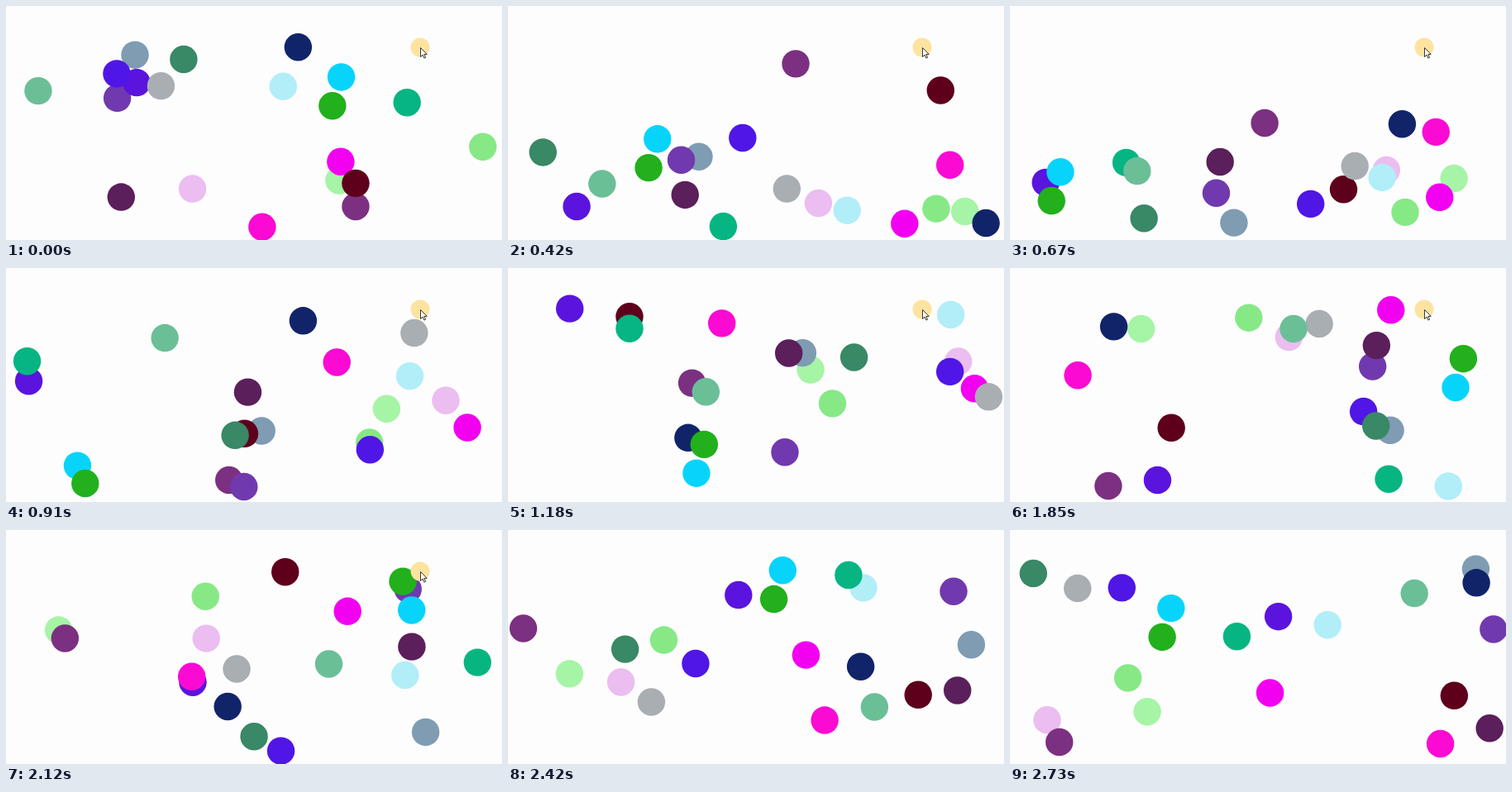
Animation of 600x283 px, one loop 2760 ms. Source, as an HTML page with a canvas:

```html
<!DOCTYPE html>
<html lang="en">
<head>
<meta charset="utf-8">
<title>Bouncing balls</title>
<style>
  html, body { margin: 0; overflow: hidden; background: #fefdfe; }
  canvas { display: block; }
</style>
</head>
<body>
<canvas id="stage" width="600" height="283"></canvas>
<script>
const ctx = document.getElementById('stage').getContext('2d');
const LOOP = 2760, STEP = 30, CURSOR_HIDES = 2130;

// The balls live on an integer grid; centres stay within FIELD_W x FIELD_H
const FIELD_W = 850, FIELD_H = 330, RADIUS = 25;
const SCALE = 0.669, LEFT = 16.2, TOP = 46.45;

// Back to front: colour, start x, start y, speed x, speed y (per tick)
const balls = [
  ['#a6f4a6', 578, 246, 2, 1],
  ['#ebbdf0', 313, 261, 2, 1],
  ['#7c3081', 608, 293, -1, 3],
  ['#86e986', 838, 185, 1, 1],
  ['#b1eef8', 477, 76, 1, 2],
  ['#7f9cb3', 209, 19, 1, -2],
  ['#7139ae', 177, 97, 1, 1],
  ['#5a14de', 212, 69, -1, 2],
  ['#5016e6', 176, 53, 2, -2],
  ['#08d4fb', 582, 59, -3, 1],
  ['#f200f0', 581, 212, 1, 1],
  ['#fb0ad3', 439, 330, 3, -1],
  ['#5e001b', 608, 251, 3, -3],
  ['#a9aeb3', 256, 75, 2, -3],
  ['#5b1f5b', 184, 276, 1, 1],
  ['#11246a', 504, 5, 3, 3],
  ['#22b01c', 566, 111, -3, 1],
  ['#07b582', 701, 105, -3, 2],
  ['#6bbf97', 34, 84, 1, -3],
  ['#398866', 297, 27, -3, -2],
];

// The pace is slightly uneven: [ms, ticks so far]
const pace = [[0, 0], [420, 112], [910, 229], [1450, 370], [1490, 370],
              [1850, 454.5], [2420, 604.5], [2730, 673]];

function ticksAt(ms) {
  const i = pace.findIndex(([end]) => end > ms);
  if (i < 0) return pace.at(-1)[1];
  const [t0, n0] = pace[i - 1], [t1, n1] = pace[i];
  const shown = Math.max(t0, t1 - Math.ceil((t1 - ms) / STEP) * STEP);
  return n0 + (n1 - n0) * (shown - t0) / (t1 - t0);
}

// A ball turns back at its first whole step on or past a wall
function bounce(start, speed, ticks, wall) {
  const step = Math.abs(speed);
  const low = start - Math.ceil(start / step) * step;
  const high = start + Math.ceil((wall - start) / step) * step;
  const size = high - low, cycle = 2 * size;
  const p = ((start + speed * ticks - low) % cycle + cycle) % cycle;
  return low + Math.min(p, cycle - p);
}

function disc(x, y, r, color) {
  ctx.fillStyle = color;
  ctx.beginPath();
  ctx.arc(x, y, r, 0, 2 * Math.PI);
  ctx.fill();
}

const arrow = new Path2D('M501.5 50.5v11l2.6-2.4 1.8 4 1.7-.8-1.8-3.9h3.4z');

function drawCursor() {
  disc(501, 50, 11.5, '#fde3a0');
  ctx.fillStyle = '#fff';
  ctx.strokeStyle = '#222';
  ctx.lineWidth = 0.9;
  ctx.fill(arrow);
  ctx.stroke(arrow);
}

function draw(now) {
  const ms = now % LOOP, ticks = ticksAt(ms);
  ctx.fillStyle = '#fefdfe';
  ctx.fillRect(0, 0, 600, 283);
  for (const [color, x, y, vx, vy] of balls) {
    disc(LEFT + SCALE * bounce(x, vx, ticks, FIELD_W),
         TOP + SCALE * bounce(y, vy, ticks, FIELD_H), SCALE * RADIUS, color);
  }
  if (ms < CURSOR_HIDES) drawCursor();
}

let start;
function frame(now) {
  start ??= now;
  draw(now - start);
  requestAnimationFrame(frame);
}
requestAnimationFrame(frame);
</script>
</body>
</html>
```
